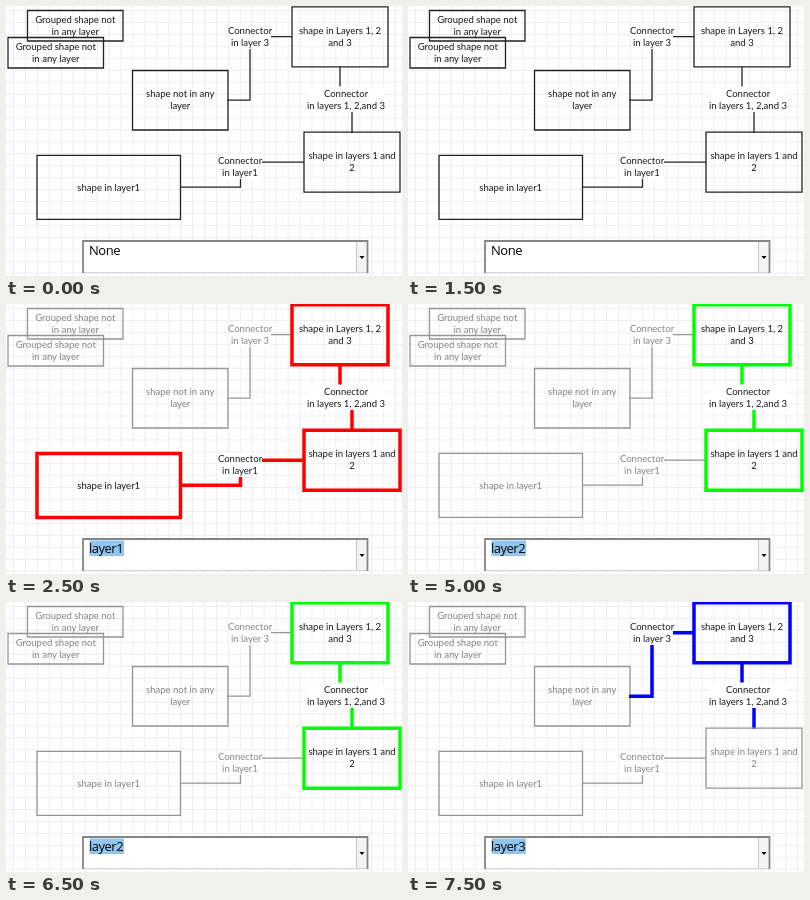
These frames come from a looping animation (396x270 px, 10 s). An HTML page:

```html
<!DOCTYPE html>
<html lang="en">
<head>
<meta charset="utf-8">
<title>Layer picker</title>
<style>
  html, body { margin: 0; width: 100%; height: 100%; overflow: hidden; background: #fff; }
  svg { display: block; width: 396px; height: 270px; }
  .item path { fill: none; stroke: var(--line); stroke-width: var(--weight); }
  .item text { font: 9.55px Lato, sans-serif; text-anchor: middle; fill: var(--ink); }
  #choice { font: 13px "Open Sans", "Noto Sans", sans-serif; letter-spacing: -.5px; }
</style>
</head>
<body>
<svg viewBox="0 0 396 270">
  <defs>
    <pattern id="grid" x="7" y="4" width="11.94" height="11.94" patternUnits="userSpaceOnUse">
      <path d="M.5 0V12M0 .5H12" stroke="#eee" fill="none"/>
    </pattern>
  </defs>
  <rect width="396" height="270" fill="#fff"/>
  <rect width="396" height="270" fill="url(#grid)"/>
  <g id="diagram"></g>
  <g id="combo">
    <rect x="76" y="234" width="286" height="33" fill="#fff"/>
    <path d="M76 266.5H362" stroke="#d4d4d4"/>
    <rect x="351" y="236" width="10" height="30" fill="#f4f4f4"/>
    <path d="M350.5 236V266" stroke="#c8c8c8"/>
    <path d="M77 267V235H361.5V267" fill="none" stroke="#858585" stroke-width="1.8"/>
    <path d="M353.5 250h5l-2.5 3z"/>
    <rect id="mark" x="83.5" y="236.5" width="34.5" height="15.5" fill="#91c5ee"/>
    <text id="choice" x="83" y="249"></text>
  </g>
</svg>
<script>
const STEP = 2500;
const choices = ["None", "layer1", "layer2", "layer3"];
const colors = ["#222", "#f00", "#0f0", "#00f"];
const diagram = document.getElementById("diagram");
const choice = document.getElementById("choice");
const mark = document.getElementById("mark");
const items = [];

// Adds a path with centred text lines; y is the middle of the first line.
function add(layers, d, x, y, lines, back = "") {
  const g = document.createElementNS("http://www.w3.org/2000/svg", "g");
  g.setAttribute("class", "item");
  g.innerHTML = back + `<path d="${d}"/>` + lines.map((line, i) =>
    `<text x="${x}" y="${y + 3.2 + i * 12}">${line}</text>`).join("");
  diagram.append(g);
  items.push({ g, layers });
}

function box(layers, x, y, w, h, textY, ...lines) {
  add(layers, `M${x} ${y}h${w}v${h}h${-w}z`, x + w / 2, textY, lines);
}

function connector(layers, d, x, y, w, ...lines) {
  add(layers, d, x, y, lines,
    `<rect x="${x - w / 2}" y="${y - 6}" width="${w}" height="25" fill="#fff"/>`);
}

box([], 21.5, 4.5, 95.5, 30.5, 13.5, "Grouped shape not", "in any layer");
box([], 2, 31.5, 95.5, 30.5, 41, "Grouped shape not", "in any layer");
box([], 126.5, 64.5, 95.5, 59.5, 88, "shape not in any", "layer");
connector([3], "M221 94.2H244V43M265 30.7H286", 244, 25, 42, "Connector", "in layer 3");
connector([1, 2, 3], "M334 61V80.5M346 106V127", 340, 87.5, 78, "Connector", "in layers 1, 2,and 3");
connector([1], "M174 181.2H234.5V173M256 156.2H298", 234, 155, 43, "Connector", "in layer1");
box([1, 2, 3], 286, .8, 96, 60, 25, "shape in Layers 1, 2", "and 3");
box([1, 2], 298, 126.2, 96, 60, 150, "shape in layers 1 and", "2");
box([1], 31, 149.4, 143.5, 64, 181.5, "shape in layer1");

function show(layer) {
  for (const { g, layers } of items) {
    const on = layers.includes(layer);
    const dim = layer > 0 && !on;
    g.style.setProperty("--line", dim ? "#959595" : colors[layer]);
    g.style.setProperty("--ink", dim ? "#858585" : "#1a1a1a");
    g.style.setProperty("--weight", on ? 3.5 : 1.3);
  }
  choice.textContent = choices[layer];
  mark.style.display = layer ? "" : "none";
}

const start = performance.now();
let shown = -1;
function tick() {
  const layer = Math.floor((performance.now() - start) / STEP) % choices.length;
  if (layer !== shown) show(shown = layer);
  requestAnimationFrame(tick);
}
tick();
</script>
</body>
</html>
```
